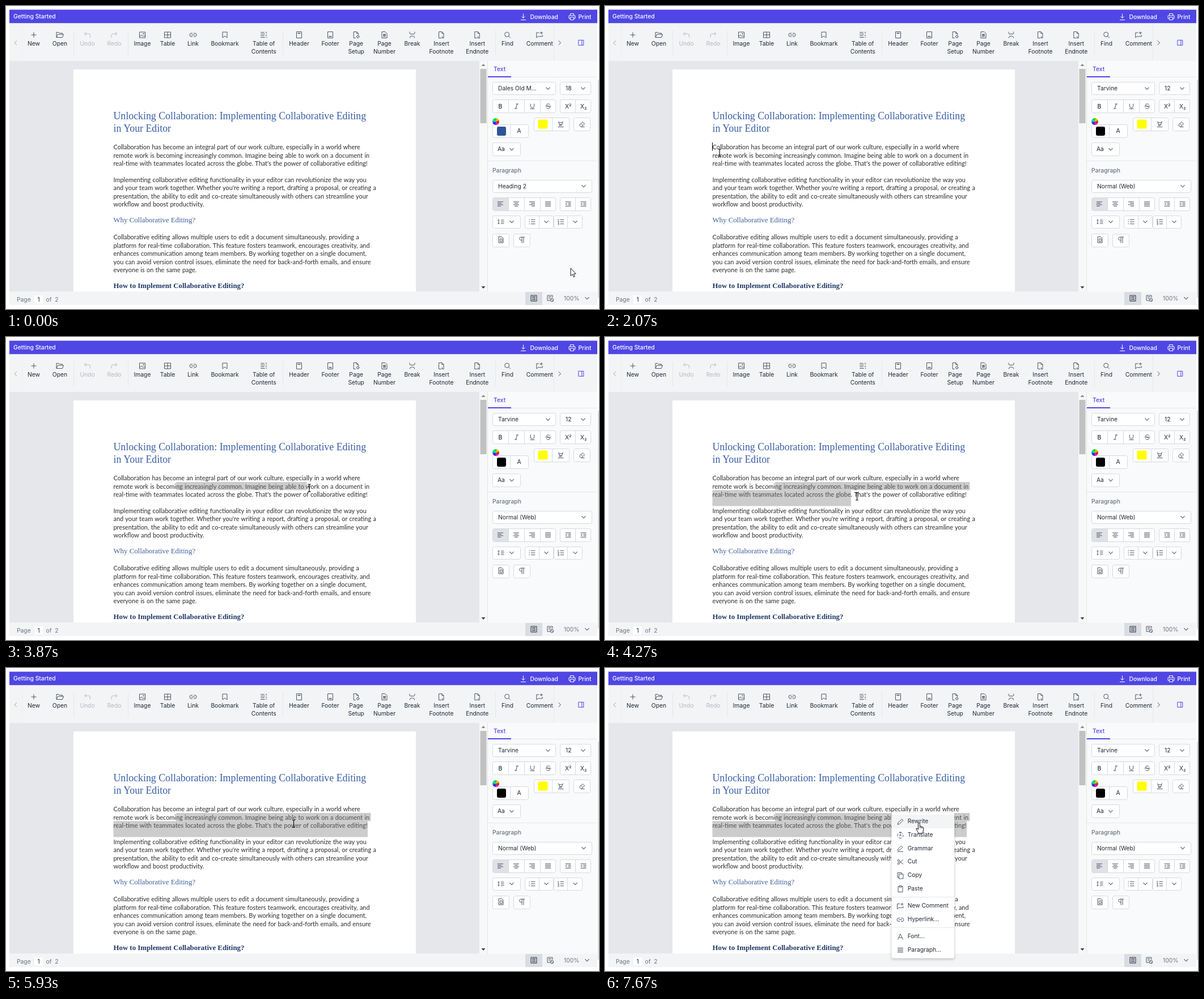
These frames come from a looping animation (1046x535 px, 8000 ms). An HTML page:

```html
<!DOCTYPE html>
<html lang="en">
<head>
<meta charset="utf-8">
<title>Document editor</title>
<style>
html, body { margin: 0; width: 100%; height: 100%; overflow: hidden; background: #fff; }
svg { display: block; }
text { font: 10.3px Inter, sans-serif; fill: #1f2937; white-space: pre; }
.mid { text-anchor: middle; }
.med { font-weight: 500; }
.gray { fill: #6b7280; }
.off { fill: #b4b9c1; }
.inv { fill: #fff; }
.tint { fill: #4f46e5; }
.h1 { font: 17.84px "Liberation Serif", serif; fill: #3a5fa5; }
.h2 { font: 12.83px "Liberation Serif", serif; fill: #3f5f9c; }
.h3 { font: bold 12.83px "Liberation Serif", serif; fill: #1f3864; }
.body { font: 10.93px Lato, sans-serif; word-spacing: .55px; fill: #2b2b2b; }
</style>
</head>
<body>
<svg id="stage" width="1046" height="535" viewBox="0 0 1046 535"></svg>
<script>
const INK = '#4b5563', EDGE = '#d6d9df', TINT = '#4f46e5';

const rect = (x, y, w, h, fill, more = '') =>
  `<rect x="${x}" y="${y}" width="${w}" height="${h}" fill="${fill}" ${more}/>`;
const text = (x, y, str, cls = '', more = '') =>
  `<text x="${x}" y="${y}" class="${cls}" ${more}>${str}</text>`;
const icon = (x, y, d, color = INK, more = '') =>
  `<path transform="translate(${x} ${y})" d="${d}" fill="none" stroke="${color}" ${more}/>`;
const vline = (x, y1, y2, color = '#dfe2e7') => rect(x, y1, 1, y2 - y1, color);

// A white rounded control with optional inner dividers
const box = (x, y, w, h, ...cuts) =>
  rect(x + .5, y + .5, w - 1, h - 1, '#fff', `rx="3" stroke="${EDGE}"`) +
  cuts.map(c => vline(c, y, y + h, EDGE)).join('');
const chevron = (x, y) => icon(x, y, 'M-3.5 -1.8L0 1.8L3.5 -1.8', INK, 'stroke-width="1.1"');

const circle = (x, y, r) => `M${x - r} ${y}a${r} ${r} 0 1 0 ${2 * r} 0a${r} ${r} 0 1 0 ${-2 * r} 0`;
const page = 'M-1 5.5H-4.5V-5.5H1L4 -2.5V0M1 -5.5V-2.5H4';
const icons = {
  plus: 'M-4.5 0H4.5M0 -4.5V4.5',
  folder: 'M-6 4.5V-4.5H-2L-.5 -3H4.5V-1M-6 4.5L-3.5 -1H6.5L4.5 4.5Z',
  undo: 'M-2 -5L-5 -2L-2 1M-5 -2H2Q5 -2 5 1V4.5',
  redo: 'M2 -5L5 -2L2 1M5 -2H-2Q-5 -2 -5 1V4.5',
  image: 'M-5 -5H5V5H-5ZM-5 3L-1.5 0L1.5 2.8L3 1.5L5 3.2' + circle(2, -2, .8),
  table: 'M-5.5 -5H5.5V5H-5.5ZM-5.5 0H5.5M0 -5V5',
  link: 'M-1 -3H-3A3 3 0 0 0 -3 3H-1M1 -3H3A3 3 0 0 1 3 3H1M-3 0H3',
  bookmark: 'M-4 -5H4V5L0 2L-4 5Z',
  contents: 'M-5.5 -4.5H1M-5.5 -1.5H2M-5.5 1.5H1M-5.5 4.5H2M3 -4.5H5.5M4 -1.5H5.5M3 1.5H5.5M4 4.5H5.5',
  header: 'M-4.5 -5.5H4.5V5.5H-4.5ZM-2.5 -3H2.5M-2.5 -2.5H2.5',
  footer: 'M-4.5 -5.5H4.5V5.5H-4.5ZM-2.5 3H2.5M-2.5 2.5H2.5',
  setup: page + circle(3, 3, 2) + 'M3 0V1M3 5V6M0 3H1M5 3H6',
  number: 'M-4.5 -5.5H1.5L4.5 -2.5V5.5H-4.5ZM-2.5 -.5H2.5M-2.5 2H2.5M-1 -2V3.5M1.2 -2V3.5',
  split: 'M-4.5 -5.5V-3.5Q-4.5 -1.5 -2.5 -1.5H2.5Q4.5 -1.5 4.5 -3.5V-5.5M-4 5.5V4Q-4 2 0 2Q4 2 4 4V5.5',
  note: page + 'M4 0V5.5H1M1.5 2.5V5.5M-1 5.5H0',
  find: circle(-.8, -.8, 4) + 'M2.2 2.2L5.3 5.3',
  comment: 'M-1 -4H-5.5V5L-3 2.8H5V0M3 -6V-1M.5 -3.5H5.5',
  download: 'M0 -5.5V2.5M-3 -.5L0 2.5L3 -.5M-4.5 5.5H4.5',
  print: 'M-3 -2V-5.5H3V-2M-3 3H-5.5V-2H5.5V3H3M-3 1H3V5.5H-3Z',
  pane: 'M-4.5 -4.5H4.5V4.5H-4.5ZM1.5 -4.5V4.5',
  left: 'M-5 -3.7H5M-5 -1.2H2M-5 1.3H5M-5 3.8H1',
  center: 'M-5 -3.7H5M-3 -1.2H3M-5 1.3H5M-3 3.8H3',
  right: 'M-5 -3.7H5M-2 -1.2H5M-5 1.3H5M-1 3.8H5',
  justify: 'M-5 -3.7H5M-5 -1.2H5M-5 1.3H5M-5 3.8H5',
  outdent: 'M-5 -3.7H5M0 -1.2H5M0 1.3H5M-5 3.8H5M-2 -1.5L-4.5 0L-2 1.5',
  indent: 'M-5 -3.7H5M0 -1.2H5M0 1.3H5M-5 3.8H5M-4.5 -1.5L-2 0L-4.5 1.5',
  spacing: 'M-4 -4V4M-5.5 -2.5L-4 -4L-2.5 -2.5M-5.5 2.5L-4 4L-2.5 2.5M0 -3H5.5M0 0H5.5M0 3H5.5',
  bullets: 'M-5.5 -3.7H-4M-5.5 0H-4M-5.5 3.7H-4M-2 -3.7H5.5M-2 0H5.5M-2 3.7H5.5',
  numbers: 'M-5 -5V-2M-5.5 -.8H-4V.8H-5.5M-5.5 2.5H-4V5H-5.5M-1.5 -3.7H5M-1.5 0H5M-1.5 3.7H5',
  marker: 'M-5 5H5M-4 -5L-2 1H2L4 -5M-3.3 -2.5H3.3M-2 1V3L2 1.8',
  eraser: 'M-4.5 1L1 -4.5L4.5 -1L-1 4.5H-2ZM-2 -1.5L1.5 2M-2 4.5H4.5',
  clip: 'M-4 -5.5H1.5L4 -3V5H-4ZM-1.5 -2H2V3H-1.5Z',
  mark: 'M5 -5H-1.5A2.7 2.7 0 0 0 -1.5 .5H0M0 -5V5.5M3 -5V5.5',
  layout: 'M-5 -5H5V5H-5ZM-3 -2.5H3M-3 0H3M-3 2.5H3',
  web: 'M0 4H-5V-5H4V-1M-3 -2.5H2M-3 0H0' + circle(3, 3, 2.8) + 'M1 1L5 5',
  pencil: 'M-4.8 4.8L-4 1.5L2.5 -4.8L4.8 -2.5L-1.5 3.9Z',
  translate: 'M-2 -4.8A5 5 0 0 1 4 -3M5 -1A5 5 0 0 1 4 3M2 4.7A5 5 0 0 1 -3 4M-4.7 2A5 5 0 0 1 -4 -3M-1 -6.5L1 -5L-1 -3.5M-1.5 1.5L0 -2L1.5 1.5',
  grammar: 'M-4.8 3L-4 .5L1.5 -5L4 -2.5L-2 3ZM-5 5.2H5',
  cut: circle(-3.3, -2.7, 1.6) + circle(-3.3, 2.7, 1.6) + 'M-2 -1.7L5 4M-2 1.7L5 -4',
  copy: 'M-2.5 -2.5H5V5.5H-2.5ZM-2.5 3H-5V-5H2.5V-2.5',
  paste: 'M-2 -4.5H-4V5.5H4V-4.5H2M-2 -5.5H2V-3H-2Z',
  font: 'M-4.5 5L0 -5L4.5 5M-2.8 1.5H2.8'
};

const tools = [
  [49, 'plus', 'New'], [95, 'folder', 'Open'], [143.5, 'undo', 'Undo'], [191, 'redo', 'Redo'],
  [240.5, 'image', 'Image'], [285, 'table', 'Table'], [330, 'link', 'Link'], [386, 'bookmark', 'Bookmark'],
  [454.7, 'contents', 'Table of', 'Contents'], [517, 'header', 'Header'], [572, 'footer', 'Footer'],
  [617.7, 'setup', 'Page', 'Setup'], [667.5, 'number', 'Page', 'Number'], [716.5, 'split', 'Break'],
  [768, 'note', 'Insert', 'Footnote'], [831.3, 'note', 'Insert', 'Endnote'],
  [884.5, 'find', 'Find'], [941.3, 'comment', 'Comment']
];

const titleBar = () =>
  rect(6, 6.5, 1037, 24, TINT) +
  text(13, 22, 'Getting Started', 'inv med') +
  icon(912.5, 19, icons.download, '#fff') + text(924.5, 22.8, 'Download', 'inv med') +
  icon(998.5, 19, icons.print, '#fff') + text(1009.5, 22.8, 'Print', 'inv med');

const toolbar = () =>
  rect(6, 30.5, 1037, 66.5, '#f3f4f6') +
  [119, 215, 488, 863].map(x => vline(x, 43, 87, '#e5e7eb')).join('') +
  vline(28, 31, 96, '#eceef1') + vline(966, 31, 96, '#e5e7eb') +
  tools.map(([x, name, a, b]) => {
    const off = /do$/.test(name);
    const lines = [a, b].filter(Boolean);
    return icon(x, 51, icons[name], off ? '#b4b9c1' : INK) +
      lines.map((s, i) => text(x, 69.6 + 14 * i, s, off ? 'mid off' : 'mid')).join('');
  }).join('') +
  icon(17, 65, 'M2 -3.8L-2 0L2 3.8', '#9ca3af') +
  icon(976.5, 65, 'M-2 -3.8L2 0L-2 3.8') +
  icon(1014.3, 64.8, icons.pane, TINT);

const paragraphs = [
  [253, 'Collaboration has become an integral part of our work culture, especially in a world where',
    'remote work is becoming increasingly common. Imagine being able to work on a document in',
    "real-time with teammates located across the globe. That's the power of collaborative editing!"],
  [310.8, 'Implementing collaborative editing functionality in your editor can revolutionize the way you',
    "and your team work together. Whether you're writing a report, drafting a proposal, or creating a",
    'presentation, the ability to edit and co-create simultaneously with others can streamline your',
    'workflow and boost productivity.'],
  [412.3, 'Collaborative editing allows multiple users to edit a document simultaneously, providing a',
    'platform for real-time collaboration. This feature fosters teamwork, encourages creativity, and',
    'enhances communication among team members. By working together on a single document,',
    'you can avoid version control issues, eliminate the need for back-and-forth emails, and ensure',
    'everyone is on the same page.']
];

const paper = () =>
  rect(6, 97, 843, 407.5, '#e5e7eb') + rect(119, 112, 604, 392.5, '#fff') +
  text(189.5, 199.8, 'Unlocking Collaboration: Implementing Collaborative Editing', 'h1') +
  text(189.5, 222, 'in Your Editor', 'h1') +
  text(189.5, 382, 'Why Collaborative Editing?', 'h2') +
  text(189.5, 498, 'How to Implement Collaborative Editing?', 'h3') +
  paragraphs.map(([y, ...rows]) =>
    rows.map((s, i) => text(189.5, y + 14.5 * i, s, 'body')).join('')).join('') +
  rect(835, 97, 14, 407.5, '#f8f8f9') + rect(836.5, 111, 11, 96, '#c1c1c1') +
  '<path d="M838.5 106L842 102L845.5 106Z" fill="#8b8b8b"/>' +
  '<path d="M838.5 495L842 499L845.5 495Z" fill="#404040"/>';

const wheel = () => Array.from({ length: 12 }, (_, i) => {
  const at = a => `${864 + 6 * Math.cos(a)} ${204 + 6 * Math.sin(a)}`;
  const a = i * Math.PI / 6;
  return `<path d="M864 204L${at(a)}A6 6 0 0 1 ${at(a + .55)}Z" fill="hsl(${360 - i * 30} 85% 45%)"/>`;
}).join('');

const sidePanel = () =>
  rect(849, 97, 194, 407.5, '#f9fafb') + vline(849, 97, 504.5) +
  rect(850, 125, 193, 1, '#e5e7eb') + rect(850, 124, 41, 2, TINT) +
  text(860, 114.7, 'Text', 'tint med') +
  box(858, 134, 112, 23) + chevron(956, 145.5) + box(977, 134, 55, 23) + chevron(1018, 145.5) +
  text(868, 149.2, '', '', 'id="family"') + text(987, 149.2, '', '', 'id="size"') +
  box(858, 165, 112, 24, 886, 914, 942) +
  text(872, 180.6, 'B', 'mid med') +
  icon(900.5, 177, 'M-1 -4H3.5M1.3 -4L-1.3 4M-3.5 4H1') +
  icon(928.5, 176.5, 'M-3.2 -4V0A3.2 3.2 0 0 0 3.2 0V-4M-4 5H4') +
  icon(956.5, 177, 'M3 -2.5Q2.5 -4.2 0 -4.2Q-3 -4.2 -3 -2.2Q-3 -.7 0 0Q3 .7 3 2.2Q3 4.2 0 4.2Q-2.7 4.2 -3.2 2.3M-5 0H5') +
  box(977, 165, 55, 24, 1004) + text(986, 180.6, 'X²') + text(1013, 180.6, 'X₂') +
  box(858, 209, 64, 24, 889) + wheel() +
  rect(866, 213, 16, 16, '#000', 'rx="3" id="swatch"') + text(905, 224.4, 'A', 'mid') +
  box(931, 197, 63, 24, 963) + rect(938.5, 200.5, 17, 16, '#ff0', 'rx="2"') + icon(978.5, 208.5, icons.marker) +
  box(1001, 197, 30, 24) + icon(1016, 209, icons.eraser) +
  box(858, 241, 50, 24) + text(867, 256.4, 'Aa') + chevron(892, 253) +
  rect(850, 273, 193, 1, '#e5e7eb') +
  text(858, 293.8, 'Paragraph', 'gray med') +
  box(858, 307, 176, 23) + text(868, 321.8, '', '', 'id="style"') + chevron(1019, 318) +
  box(858, 338, 112, 24, 886, 914, 942) + rect(859, 339, 27, 22, '#dfe1e6') +
  ['left', 'center', 'right', 'justify'].map((n, i) => icon(872 + 28 * i, 349.5, icons[n])).join('') +
  box(977, 338, 55, 24, 1004) + icon(991.5, 349.5, icons.outdent) + icon(1018.5, 349.5, icons.indent) +
  box(858, 370, 50, 23) + icon(873, 381, icons.spacing) + chevron(892, 381) +
  box(915, 370, 51, 23, 940) + icon(928, 381, icons.bullets) + chevron(953, 381) +
  box(966, 370, 51, 23, 990) + icon(979, 381, icons.numbers) + chevron(1004, 381) +
  box(858, 402, 30, 24) + icon(873, 413, icons.clip) +
  box(895, 402, 30, 24) + icon(910, 413, icons.mark) +
  vline(1044.5, 130, 515, '#b9bcc2');

const statusBar = () =>
  rect(6, 504.5, 1037, 23.5, '#f3f4f6') +
  text(19, 521.6, 'Page', 'gray') + rect(50, 511, 15, 14, '#fff') +
  text(57.5, 521.6, '1', 'mid') + text(70.5, 521.6, 'of  2', 'gray') +
  rect(916, 505, 30, 23, '#d9dce2') + icon(931, 516, icons.layout, '#1f2937') + icon(960, 516, icons.web) +
  text(984, 519.8, '100%', 'gray') + chevron(1025, 516);

const items = [
  [271, 'pencil', 'Rewrite'], [295, 'translate', 'Translate'], [318.5, 'grammar', 'Grammar'],
  [342, 'cut', 'Cut'], [366, 'copy', 'Copy'], [389.5, 'paste', 'Paste'],
  [420, 'comment', 'New Comment'], [444, 'link', 'Hyperlink...'],
  [474, 'font', 'Font...'], [497.7, 'justify', 'Paragraph...']
];
const menu = () =>
  '<g id="menu"><g style="filter:drop-shadow(0 2px 2px #0003)">' +
  rect(505.5, 255, 110.5, 257.5, '#fff', 'rx="3" stroke="#e5e7eb" stroke-width=".6"') + '</g>' +
  rect(506, 259, 110, 24, '#f3f4f6') +
  [404, 458].map(y => rect(506, y, 110, 1, '#e5e7eb')).join('') +
  items.map(([y, n, s]) => icon(521, y + .5, icons[n]) + text(533.7, y + 3.4, s)).join('') + '</g>';

const cursors =
  '<g id="arrow"><path d="M.5 .5V14L3.6 11.2L5.8 16L7.8 15L5.7 10.4H9.8Z" fill="#fff" stroke="#000" stroke-width=".9"/></g>' +
  '<g id="beam"><path d="M-2.5 -6.5H-.8L0 -6L.8 -6.5H2.5M0 -6V6M-2.5 6.5H-.8L0 6L.8 6.5H2.5" fill="none" stroke="#111" stroke-width="1.2"/></g>' +
  '<g id="hand"><path d="M-1.5 .8Q0 -1.2 1.3 .8V6L3 6.2L6.5 7.5Q8.2 8.2 8 10.5L7 15.5L6 18.5H-1L-2 16L-5 11.5Q-5.8 9.8 -4.2 9.6L-1.5 11.5Z" fill="#fff" stroke="#111" stroke-width="1"/>' +
  '<path d="M1.3 6V9.5M3.6 6.8V9.8M5.9 7.6V10" stroke="#111" stroke-width=".8"/></g>';

stage.innerHTML = paper() +
  '<g fill="gray" fill-opacity=".4"><rect id="selA" x="300" y="256" height="14.3"/><rect id="selB" x="189.5" y="270.3" height="28.2"/></g>' +
  rect(189, 241, 1, 14.5, '#000', 'id="caret"') +
  titleBar() + toolbar() + sidePanel() + statusBar() + menu() + cursors;

const el = id => document.getElementById(id);
const show = (id, on) => el(id).setAttribute('visibility', on ? 'visible' : 'hidden');

// Keys are [time, ...values]; values ease between neighbours
const pointerKeys = [
  [70, 995.5, 462.5], [870, 199, 244], [1000, 199, 244], [1200, 187.3, 246.5], [1470, 187.3, 246.5],
  [2270, 205, 262], [2330, 205, 262], [2530, 188.8, 249.5], [2870, 188.8, 249.5], [3150, 301, 261],
  [3670, 584, 261], [3730, 584, 261], [4100, 425, 279], [4260, 444.5, 281.5], [4530, 460, 282],
  [4600, 460, 282], [5130, 635, 287], [5400, 639, 287], [5670, 639, 287], [5930, 507.5, 275],
  [7130, 507.5, 275], [7660, 554, 273.5]
];
const selectKeys = [
  [3150, 300], [3670, 580], [3730, 580], [4100, 420], [4260, 434],
  [4530, 452], [4600, 452], [5130, 634], [5400, 638]
];
function tween(keys, t) {
  const i = keys.findIndex(k => k[0] > t);
  if (i < 0) return keys.at(-1).slice(1);
  if (!i) return keys[0].slice(1);
  const [a, b] = [keys[i - 1], keys[i]];
  const u = (t - a[0]) / (b[0] - a[0]), e = u * u * (3 - 2 * u);
  return a.slice(1).map((v, j) => v + (b[j + 1] - v) * e);
}

const STEP = 1000 / 15;

function draw(now) {
  const t = Math.floor((now % 8000 + 5) / STEP) * STEP;
  const [x, y] = tween(pointerKeys, t);
  const [end] = tween(selectKeys, t);
  const thirdRow = t >= 3915, menuOpen = t >= 6530, clicked = t >= 1860;

  el('selA').setAttribute('width', thirdRow ? 343.5 : end - 300);
  el('selB').setAttribute('width', thirdRow ? end - 189.5 : 0);
  show('caret', clicked && t < 3150);
  show('menu', menuOpen);

  el('family').textContent = clicked ? 'Tarvine' : 'Dales Old M...';
  el('size').textContent = clicked ? '12' : '18';
  el('style').textContent = clicked ? 'Normal (Web)' : 'Heading 2';
  el('swatch').setAttribute('fill', clicked ? '#000' : '#2f5496');

  const kind = menuOpen ? 'hand' : x >= 190 && x <= 652 ? 'beam' : 'arrow';
  for (const id of ['arrow', 'beam', 'hand']) show(id, id === kind);
  el(kind).setAttribute('transform', `translate(${x} ${y})`);
}

const start = performance.now();
function loop() {
  draw(performance.now() - start);
  requestAnimationFrame(loop);
}
loop();
</script>
</body>
</html>
```
